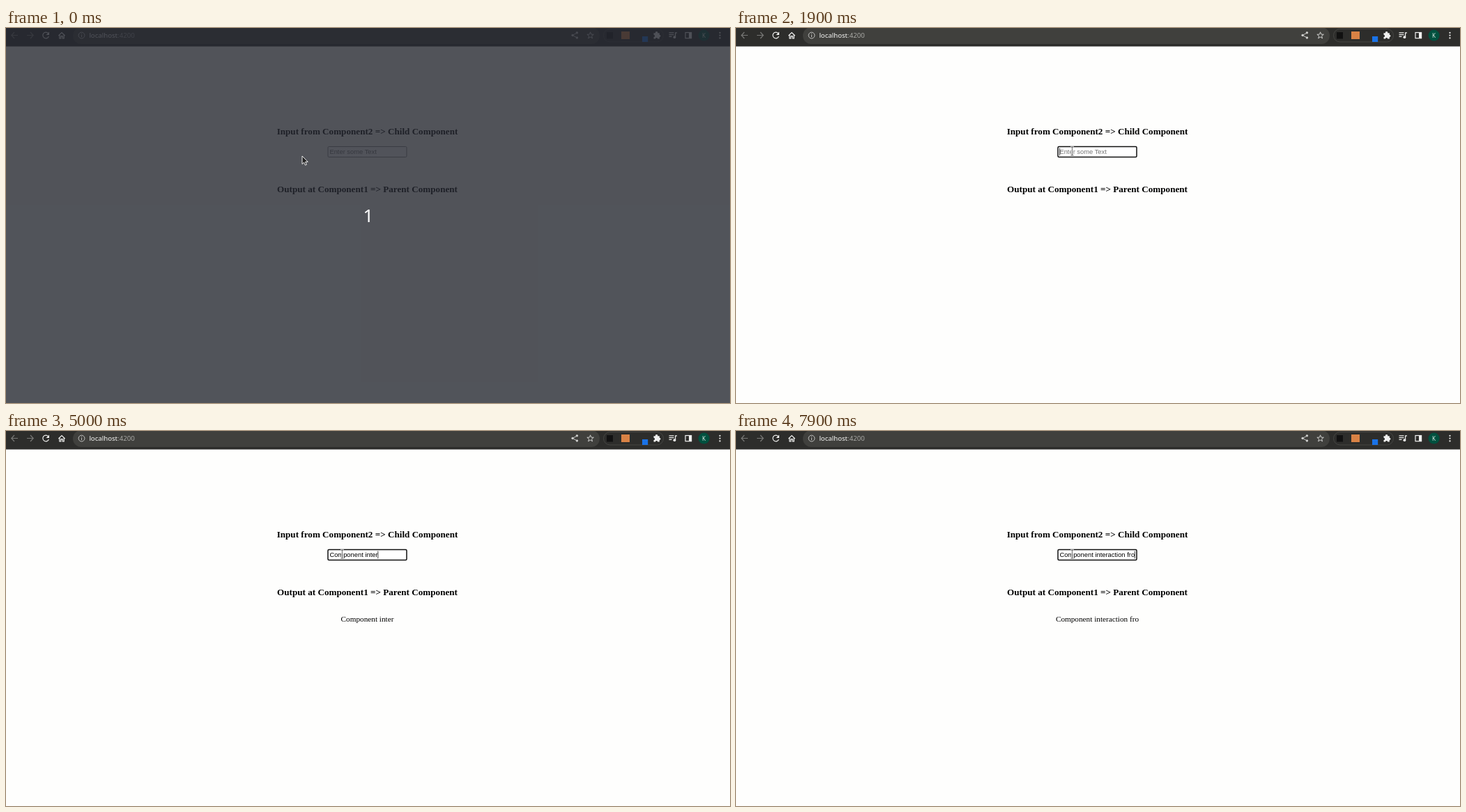
Write an HTML page that moves like this. It is 1039x539 px and loops after 8000 ms.

```html
<!DOCTYPE html>
<html lang="en">
<head>
<meta charset="utf-8">
<title>Component interaction</title>
<style>
  html, body { margin: 0; width: 100%; height: 100%; overflow: hidden; background: #fefefd; }
  svg { display: block; width: 1039px; height: 539px; }
  .ui { font-family: "Noto Sans", sans-serif; }
  .heading { font: bold 13.15px "Liberation Serif", serif; text-anchor: middle; }
  .field { font: 9.37px "Liberation Sans", sans-serif; white-space: pre; }
  .output { font: 11.24px "Liberation Serif", serif; text-anchor: middle; }
  .line { fill: none; stroke: #f1f1f0; stroke-width: 1.2; }
  .off { stroke: #777775; }
  .solid { fill: #f1f1f0; }
</style>
</head>
<body>
<svg viewBox="0 0 1039 539">
  <rect width="1039" height="539" fill="#fefefd"/>

  <g id="toolbar">
    <rect width="1039" height="26.5" fill="#2d2d2b"/>
    <rect x="96" y="-1" width="756" height="24" rx="12" fill="#40403d"/>
    <rect x="857.5" y="1.5" width="86" height="18.5" rx="9.2" fill="none" stroke="#464643"/>

    <path class="line off" d="M17 10.5H8M12 6L7.8 10.5L12 15M30 10.5H39M35 6L39.2 10.5L35 15"/>
    <path class="line" stroke-width="1.4" d="M60.6 7.6A4.4 4.4 0 1 0 61.4 12"/>
    <path class="solid" d="M62 5.6V10H57.6Z"/>
    <path class="line" d="M75.4 11L80 6.6L84.6 11M76.8 10V14.8H78.8V11.6H81.2V14.8H83.2V10"/>

    <g stroke="#c4c4c2" fill="none">
      <circle cx="108.5" cy="10.6" r="4.4"/>
      <path d="M108.5 10V13M108.5 8V9"/>
    </g>
    <text class="ui" x="119.4" y="14.2" font-size="9.65" fill="#f8f8f7">localhost<tspan fill="#a9a9a6">:4200</tspan></text>

    <g fill="#cfcfcd" stroke="#cfcfcd">
      <path fill="none" d="M819.5 7L813 10.4L819.5 14"/>
      <circle cx="819.4" cy="6.8" r="1.2"/>
      <circle cx="813" cy="10.4" r="1.2"/>
      <circle cx="819.4" cy="14" r="1.2"/>
    </g>
    <path id="star" fill="none" stroke="#cfcfcd"/>

    <rect x="862" y="6" width="9" height="9.5" fill="#111"/>
    <rect x="883" y="5" width="12" height="11" fill="#d98245"/>
    <rect x="913" y="12" width="8.2" height="8" fill="#1a73e8"/>

    <path class="solid" d="M929.5 7.2H932A1.7 1.7 0 1 1 935.3 7.2H937.8V9.7A1.6 1.6 0 1 1 937.8 13V15.6H935.2A1.6 1.6 0 0 0 932 15.6H929.5V13A1.6 1.6 0 0 0 929.5 9.8Z"/>
    <path class="line" d="M951.5 6.8H958.5M951.5 9.6H958.5M951.5 12.4H955.5M960.6 13V6.8H963"/>
    <circle class="solid" cx="959.4" cy="13.2" r="1.9"/>
    <rect class="line" x="975" y="6.5" width="8.6" height="8.2"/>
    <rect class="solid" x="980" y="6.5" width="3.6" height="8.2"/>
    <circle cx="1001.6" cy="10.6" r="8" fill="#00513f"/>
    <text class="ui" x="1001.6" y="13.5" font-size="8" fill="#e4efea" text-anchor="middle">K</text>
    <g class="solid">
      <circle cx="1024.5" cy="6.8" r="1.15"/>
      <circle cx="1024.5" cy="10.6" r="1.15"/>
      <circle cx="1024.5" cy="14.4" r="1.15"/>
    </g>
  </g>

  <text class="heading" x="518.5" y="153.4">Input from Component2 =&gt; Child Component</text>
  <rect id="box" x="462" y="170.5" width="113" height="15" rx="1.5" fill="#fff"/>
  <text id="typed" class="field" x="464.4" y="181"></text>
  <path id="caret" stroke="#111" stroke-width=".8"/>
  <text class="heading" x="518.5" y="235.9">Output at Component1 =&gt; Parent Component</text>
  <text id="echo" class="output" x="518.5" y="273.5"></text>

  <g id="countdown">
    <rect width="1039" height="539" fill="#262931" fill-opacity=".8"/>
    <text class="ui" x="512.6" y="279.3" font-size="26" fill="#fff">1</text>
  </g>

  <path id="arrow" d="M0 0V11.6L2.6 9.2L4.5 13.2L6.4 12.3L4.6 8.4H8.2Z" fill="#222" stroke="#fff" stroke-width=".9"/>
  <g id="beam" fill="none">
    <path d="M-2.4 -6H2.4M0 -6V6M-2.4 6H2.4" stroke="#fff" stroke-width="2.6" stroke-opacity=".8"/>
    <path d="M-2.2 -6H2.2M0 -6V6M-2.2 6H2.2" stroke="#555" stroke-width=".9"/>
  </g>
</svg>

<script>
  const LOOP = 8000, STEP = 100, FOCUS = 1900, BLINK = 600;
  const MESSAGE = "Component interaction fro";
  // One time per typed character.
  const KEY_TIMES = [
    2800, 2900, 3200, 3400, 3500, 3900, 4000, 4100, 4300, 4400,
    4600, 4700, 4900, 5000, 5000, 5400, 6100, 6500, 6700, 6800, 7000,
    7200, 7400, 7600, 7900
  ];
  const $ = id => document.getElementById(id);
  const [box, typed, caret, echo, countdown, arrow, beam] =
    ["box", "typed", "caret", "echo", "countdown", "arrow", "beam"].map($);

  const setAttrs = (el, attrs) => {
    for (const name in attrs) el.setAttribute(name, attrs[name]);
  };
  const show = (el, visible) => el.setAttribute("visibility", visible ? "visible" : "hidden");

  const starPoints = Array.from({ length: 10 }, (_, i) => {
    const radius = i % 2 ? 2.1 : 5, angle = i * Math.PI / 5;
    return [838.6 + radius * Math.sin(angle), 10.8 - radius * Math.cos(angle)];
  });
  $("star").setAttribute("d", "M" + starPoints.join("L") + "Z");

  function drawPointer(t) {
    const ease = 1 - Math.pow(1 - Math.min(t / 900, 1), 3.7);
    const x = 425 + 57.4 * ease;
    const y = 184 - 7 * ease;
    const overField = x > 462;
    show(arrow, !overField);
    show(beam, overField);
    setAttrs(overField ? beam : arrow, { transform: `translate(${x} ${y})` });
  }

  function drawField(t) {
    const count = KEY_TIMES.filter(time => time <= t).length;
    const value = MESSAGE.slice(0, count);
    const focused = t >= FOCUS;
    setAttrs(box, { stroke: focused ? "#101010" : "#808080", "stroke-width": focused ? 1.5 : 0.9 });

    typed.textContent = value || "Enter some Text";
    typed.setAttribute("fill", value ? "#000" : "#757575");
    echo.textContent = value.trim();

    const lastInput = count ? KEY_TIMES[count - 1] : FOCUS;
    const caretX = 464.6 + (value ? typed.getComputedTextLength() : 0);
    caret.setAttribute("d", `M${caretX} 172.6V183.4`);
    show(caret, focused && t - lastInput < BLINK);
  }

  function draw(elapsed) {
    const t = Math.floor((elapsed % LOOP) / STEP) * STEP;
    show(countdown, t < STEP);
    drawPointer(t);
    drawField(t);
  }

  const start = performance.now();
  function tick() {
    draw(performance.now() - start);
    requestAnimationFrame(tick);
  }
  tick();
</script>
</body>
</html>
```
